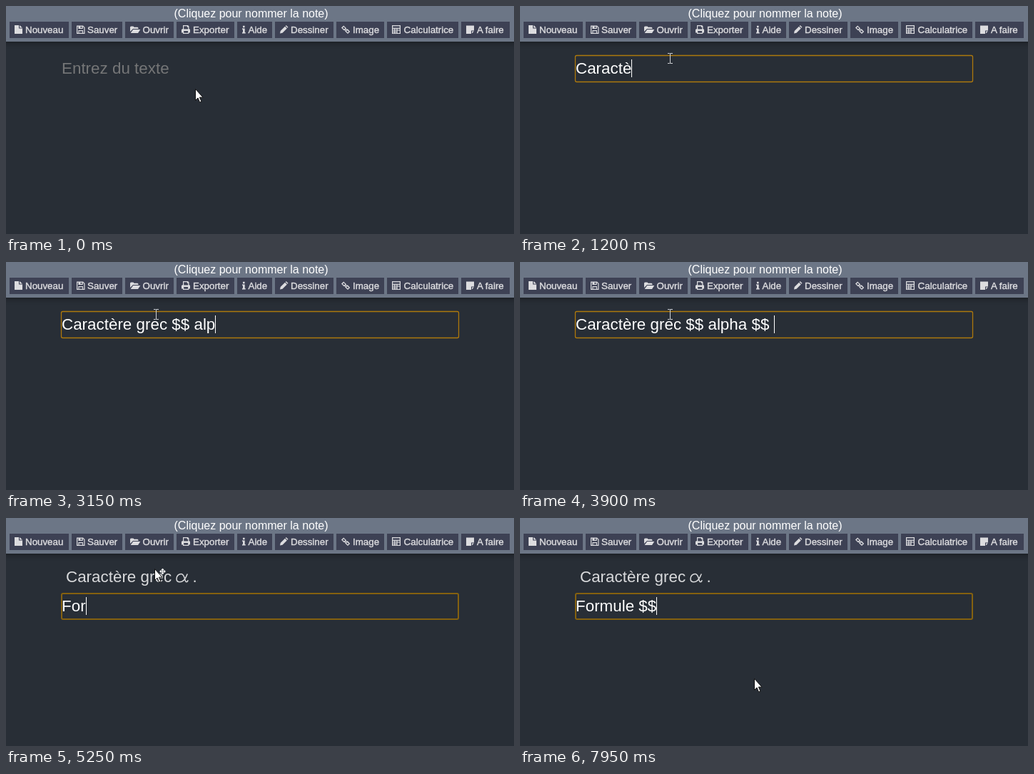
An HTML page that plays this animation: 712x320 px, repeating every 8 s.

```html
<!DOCTYPE html>
<html lang="fr">
<head>
<meta charset="utf-8">
<title>Note</title>
<style>
  html, body { margin: 0; width: 100%; height: 100%; overflow: hidden; background: #282e36; }
  svg { display: block; width: 712px; height: 320px; font-family: "Liberation Sans", Arial, sans-serif; }
  text { white-space: pre; }
  .bar { fill: #6c7686; filter: drop-shadow(0 1px 4px rgba(0, 0, 0, .45)); }
  .title { font-size: 16px; fill: #fff; }
  .btn rect { fill: #3d4154; }
  .btn text { font-size: 13.333px; fill: #dcdcdf; stroke: #dcdcdf; stroke-width: .4px; }
  .icon { fill: #dcdcdf; fill-rule: evenodd; }
  .big { font-size: 22.4px; }
  .ring { fill: none; }
  .pointer { fill: #fff; stroke: #111; stroke-width: 1; }
</style>
</head>
<body>
<svg viewBox="0 0 712 320">
  <rect width="712" height="320" fill="#282e36"/>
  <rect class="bar" x="-10" y="-10" width="732" height="60"/>
  <text class="title" x="235.5" y="16">(Cliquez pour nommer la note)</text>
  <g id="bar"></g>

  <g id="output" fill="#d9dadc">
    <text class="big" x="84" y="90">Caractère grec</text>
    <path id="alpha" fill="none" stroke="#d9dadc" stroke-width="1.5" stroke-linecap="round"
      d="M16 -11C13.5 -4 10 -.2 5.6 -.2C2.6 -.2 1 -2.2 1 -4.7C1 -8.6 4 -11.6 7.5 -11.6C13.2 -11.6 12 -.2 14.9 -.2C16 -.2 16.6 -1 16.9 -2.2"/>
    <text class="big" id="dot" y="90">.</text>
  </g>

  <g id="field">
    <rect class="ring" id="ring" rx="2"/>
    <text class="big" id="value" x="78" y="95"></text>
    <rect id="caret" y="75" width="1" height="25" fill="#fff"/>
  </g>

  <g id="status">
    <rect x="1.5" y="297.5" width="154" height="20" fill="#eeedef" stroke="#c8c8cb"/>
    <text x="10" y="312" font-size="12.85" fill="#000">Typesetting math: 100%</text>
  </g>

  <g id="mouse">
    <path id="beam" fill="none" stroke="#cfd1d4" d="M-3 -6.5h2.5l.5 .5l.5 -.5H4M.5 -6V7M-3 7.5h2.5l.5 -.5l.5 .5H4"/>
    <path id="arrow" class="pointer" d="M.5 .5V16.5L4 13L6.6 19.2L9 18.2L6.4 12.2H11Z"/>
    <path id="cross" fill="none" stroke="#fff" stroke-width="1.2"
      d="M8 4h7M11.5 .5v7M10 2l1.5 -1.5L13 2M10 6l1.5 1.5L13 6M9.500 2.500L8 4l1.500 1.500M13.500 2.500L15 4l-1.500 1.500"/>
  </g>
</svg>
<script>
const $ = id => document.getElementById(id);

// label, left, width, text x, icon path
const buttons = [
  ["Nouveau", 5, 83, 27, "M0 0h6v4.500h5V12H0ZM7 0l4 3.500H7Z"],
  ["Sauver", 92, 71, 114, "M0 .5h9l2.500 2.500v9H0ZM1.200 1.700v9h1.200V7h6.600v3.700h1.300V3.500L8.700 1.700V5H2.400V1.700ZM5.500 1.700h1.800v2.300H5.500ZM3.500 8.200v2.500h4.500V8.200Z"],
  ["Ouvrir", 167, 68, 191.6, "M0 9V2.500L1 1.500h3.500l1 1.300h5L11.500 4v1H4ZM.6 11L4.300 6H14.300L11 11Z"],
  ["Exporter", 239, 81, 262, "M2 0h7l1.500 1.500V5l1.500 1v4.500h-1.800V12H2V10.500H0V6l2 -1ZM3.200 1.200V5.500h6V2.800H7.800V1.200ZM3.200 8v2.800h5.900V8Z"],
  ["Aide", 324, 49, 339.5, "M1 .8h2.600v2.400H1ZM0 4.500h3.700v5.500h1v1.500H0V10h1V6H0Z"],
  ["Dessiner", 377, 82, 399, "M0 11.500L.7 8L7 1.700L9.800 4.500L3.500 10.800ZM7.700 1L8.700 0l2.800 2.800l-1 1Z"],
  ["Image", 463, 67, 486, "M3.200 .5L7 4.300L6 7.500L3.300 7L0 3.500ZM3.400 2.300L1.800 3.700L4 5.800L5.400 4.300ZM6 5.200l3 .3L12.200 9L9 12L5.300 8.500ZM7.700 7L7 8.300L9 10.200L10.400 8.800Z"],
  ["Calculatrice", 534, 100, 557.6, "M0 0h12v12H0ZM1.200 1.200v2.600h9.600V1.200ZM1.200 5v1.600h2V5ZM4.400 5v1.600h2V5ZM7.600 5v1.600h3.200V5ZM1.200 7.600v1.300h2V7.600ZM4.400 7.600v1.300h2V7.600ZM7.600 7.600V11h3.200V7.600ZM1.200 9.900V11h2V9.900ZM4.400 9.900V11h2V9.900Z"],
  ["A faire", 638, 68, 660, "M0 .5h11v7H7V12H0ZM8 8.500h3L8 11.500Z"]
];
$("bar").innerHTML = buttons.map(([label, x, w, tx, icon]) =>
  `<g class="btn"><rect x="${x}" y="22" width="${w}" height="23"/>
   <path class="icon" transform="translate(${x + 7} 27)" d="${icon}"/>
   <text x="${tx}" y="38">${label}</text></g>`).join("");

// Typed content: start in ms, field text
const first = "Caractère grec $$ alpha $$ .";
const typed = [[0, ""]];
const typeFirst = (start, lengths) =>
  lengths.forEach((n, i) => typed.push([start + i * 150, first.slice(0, n)]));
typeFirst(600, [1, 2, 4, 5, 7, 8, 10]);
typeFirst(1650, [11, 12, 13, 15, 16, 17, 18]);
typeFirst(2850, [19, 20, 21, 22, 23, 24, 25, 27]);
typed.push(
  [4200, first], [4350, ""], [4950, "F"], [5100, "Fo"], [5250, "For"], [5400, "Foru"], [5550, "For"],
  [5850, "Form"], [6000, "Formu"], [6150, "Formule"], [6300, "Formule$"], [6450, "Formule$$"],
  [6750, "Formule$$ "], [7200, "Formule$$"], [7350, "Formule$"], [7500, "Formule"],
  [7650, "Formule "], [7950, "Formule $$"]
);

// Mouse: start in ms, shape, x, y
const mouse = [
  [0, "arrow", 265, 116], [150, "beam", 210, 73], [4350, "cross", 208, 71],
  [6000, "arrow", 272, 152], [6150, "arrow", 328, 225]
];

const pen = document.createElement("canvas").getContext("2d");
pen.font = '22.4px "Liberation Sans", Arial, sans-serif';

const at = (steps, t) => steps.findLast(s => s[0] <= t);
const show = (id, on) => $(id).style.display = on ? "" : "none";
const set = (id, attrs) => Object.entries(attrs).forEach(([k, v]) => $(id).setAttribute(k, v));

function draw(t) {
  const text = at(typed, t)[1];
  const focused = t >= 300;
  const sent = t >= 4350;
  const scaled = t >= 4500;

  $("value").textContent = text || "Entrez du texte";
  set("value", { fill: text ? "#fff" : "#757677" });
  set("caret", { x: Math.round(78 + pen.measureText(text).width) });
  show("caret", focused);
  show("ring", focused);
  set("ring", sent
    ? { x: 78, y: 70, width: 556, height: 36, stroke: "#85610f", "stroke-width": 2 }
    : { x: 77.5, y: 69.5, width: 557, height: 37, stroke: "#ad780c", "stroke-width": 1.3 });
  set("field", { transform: `translate(0 ${sent ? 36 : 0})` });

  show("output", sent);
  set("alpha", { transform: `translate(238 90) scale(${scaled ? 1 : 0.7})` });
  set("dot", { x: scaled ? 261.5 : 255.5 });
  show("status", sent && t < 4800);

  const [, shape, x, y] = at(mouse, t);
  set("mouse", { transform: `translate(${x} ${y})` });
  show("beam", shape === "beam");
  show("arrow", shape !== "beam");
  show("cross", shape === "cross");
}

const start = performance.now();
function tick() {
  draw((performance.now() - start) % 8000);
  requestAnimationFrame(tick);
}
tick();
</script>
</body>
</html>
```
